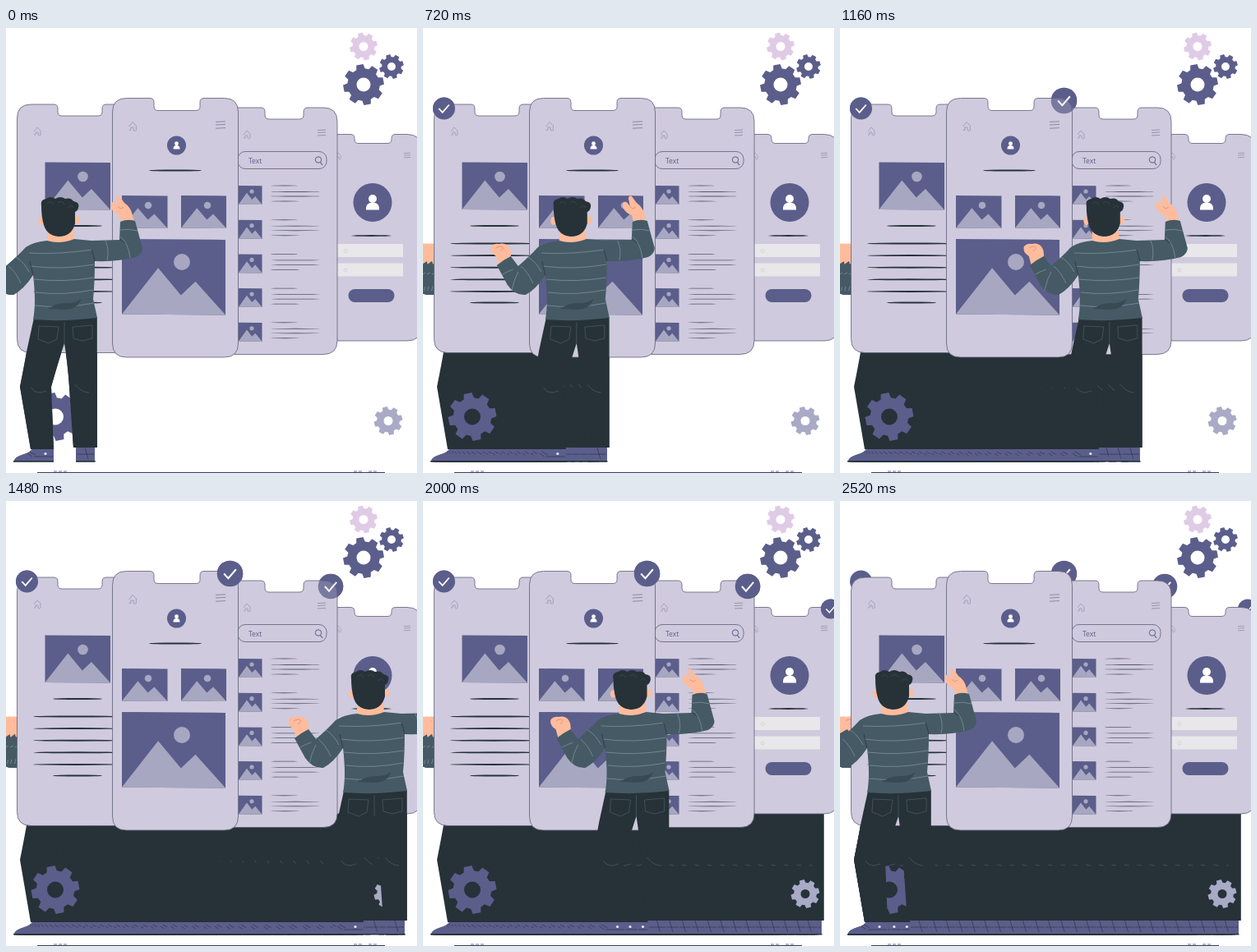
An HTML page that plays this animation: 500x542 px, repeating every 2560 ms.

```html
<!DOCTYPE html>
<html lang="en">
<head>
<meta charset="utf-8">
<title>App screens</title>
<style>
html, body { margin: 0; width: 100%; height: 100%; overflow: hidden; background: #fff; }
svg { display: block; width: 100vw; height: 100vh; }
</style>
</head>
<body>
<svg viewBox="0 0 500 542" preserveAspectRatio="none">
  <defs>
    <g id="man">
      <!-- shoes -->
      <path fill="#5b5e8b" d="M33 511L58 512V527H10Q11 522 22 519Q30 517 33 511ZM85 510H108V527H85Z"/>
      <path stroke="#263238" stroke-width="1.400" d="M9 527.800H58M85 527.800H108.500"/>
      <path fill="none" stroke="#263238" stroke-width=".6" d="M29 516L36 520M26 518L32 522M34 522H57M86 519H107M96 511L100 525"/>
      <circle cx="48" cy="518.500" r="1.600" fill="#e8e8f2"/>
      <!-- trousers -->
      <path fill="#263238" d="M34 353Q70 357 110.800 352V511H82Q79 470 77 437Q75 408 71 384Q64 405 55 437L58 513L30 513Q24 478 17 437Q22 412 25.500 392Z"/>
      <path fill="none" stroke="#53656d" stroke-width=".6" d="M40 363L64 364L62 379L52 384L39 379ZM81 364L105 362V378L93 381L82 378ZM31 438Q34 444 42 444L49 442M84 434Q92 444 101 444M71 358V384"/>
      <!-- left hand, neck, ears, right hand -->
      <g fill="#ffbc9c">
        <path d="M-24 289L-27 278Q-35 273 -33 266Q-29 262 -24 263Q-16 261 -12 266Q-8 271 -9 280Z"/>
        <path d="M50 245H82L83 258Q67 265 50 260Z"/>
        <ellipse cx="43" cy="235" rx="3.500" ry="5"/>
        <ellipse cx="86" cy="234" rx="3.500" ry="5"/>
        <path d="M141 238L138 228Q128 224 127 216Q128 211 132 212L136 217L134 207Q136 202 139 206L144 213Q151 218 153 225L156 236Z"/>
      </g>
      <path fill="none" stroke="#d3836d" stroke-width=".7" d="M-27 268Q-21 264 -18 268L-22 272M136 217Q139 222 143 218"/>
      <!-- sweater -->
      <path fill="#455a64" d="M50 259Q66 264 83 257L104 259L138 258L139 236Q148 232 157 235L166 268Q166 275 158 279Q136 285 108 284Q108 310 106 330L111 353Q70 358 33 355Q37 335 33 301Q22 318 9 325Q-4 326 -13 313L-26 289Q-19 283 -9 278L0 290Q14 278 24 267Q35 260 50 259Z"/>
      <path fill="none" stroke="#8399a3" stroke-width=".7" d="M28 274Q65 276 105 270M30 290Q67 295 107 288M34 306Q70 310 107 304M36 322Q70 326 106 319M35 338Q70 342 107 335M121 259Q126 270 123 283M139 254Q149 262 151 280M139 246Q150 244 160 247M12 279Q22 285 28 297M3 290Q12 297 18 311M-6 294Q-14 297 -19 300M0 297Q-5 306 -8 320"/>
      <path fill="none" stroke="#263238" stroke-width=".7" d="M108 284Q106 275 104 269M33 301L29 284M139 258L145 262M52 341Q75 344 91 331"/>
      <path fill="#384a53" d="M52 342Q60 334 78 335Q87 334 91 330Q88 343 70 343Z"/>
      <!-- hair -->
      <path fill="#263238" d="M43 217Q41 209 49 208Q54 204 60 208Q66 204 72 208Q79 206 82 211Q90 212 88 219Q87 223 84 224L84 238Q80 254 64 254Q50 253 46 240Q43 230 43 217Z"/>
      <path fill="none" stroke="#46565d" stroke-width=".5" d="M50 214Q55 209 58 215M63 213Q69 209 71 215M75 219Q81 214 82 219"/>
    </g>
    <g id="home" fill="none" stroke="#9a9ab8" stroke-width=".8">
      <path d="M-4 0L0-5L4-1V4Q3 6 1 4V1H-2V4H-4"/>
    </g>
    <g id="menu" stroke="#7d7f9b" stroke-width=".7">
      <path d="M-5-3L5-3.500M-5 0L5-.500M-5 3.500L5 3"/>
    </g>
    <g id="face">
      <circle r="23.500" fill="#5b5e8b"/>
      <circle cy="-4.500" r="5" fill="#fff"/>
      <path d="M-8 9V6Q-7 0 0 0Q7 0 8 6V9Z" fill="#fff"/>
    </g>
    <g id="pic">
      <path d="M0 0L100 1V100L0 99Z" fill="#5b5e8b"/>
      <path d="M0 99L35 38L57 74L71 56L100 100Z" fill="#a8a7c1"/>
    </g>
    <g id="check">
      <circle r="15" fill="#5b5e8b"/>
      <path d="M-7 0L-2 5.500L7-5" fill="none" stroke="#fff" stroke-width="2"/>
    </g>
  </defs>
  <rect width="500" height="542" fill="#fff"/>
  <path d="M38 541.500H461" stroke="#3c3f5c"/>
  <path d="M58 540H75M423 540H433M441 540H451" stroke="#6d6f88" stroke-dasharray="4 2"/>
  <g id="trail"></g>
  <g id="marks"></g>
  <g id="gears"></g>
  <g id="phones"></g>
  <g id="ticks"></g>
  <use id="hero" href="#man"/>
</svg>
<script>
const $ = id => document.getElementById(id);
const INK = '#5b5e8b', STEP = 40, COUNT = 64, REACH = 377;

function gear(x, y, r, hole, color, turn) {
  const p = [];
  for (let i = 0; i < 8; i++) {
    [[-.27, .79], [-.17, 1], [.17, 1], [.27, .79]].forEach(([a, k]) => {
      const w = turn + i * Math.PI / 4 + a;
      p.push((x + r * k * Math.cos(w)).toFixed(1) + ' ' + (y + r * k * Math.sin(w)).toFixed(1));
    });
  }
  return `<path fill="${color}" fill-rule="evenodd" d="M${p.join('L')}ZM${x - hole} ${y}a${hole} ${hole} 0 1 0 ${2 * hole} 0a${hole} ${hole} 0 1 0 ${-2 * hole} 0Z"/>`;
}

function phone(l, t, r, b, n1, n2, depth) {
  const d = depth - 5;
  return `<path fill="#cfcadd" stroke="#5d6079" stroke-width=".8" d="M${l} ${t + 17}Q${l} ${t} ${l + 17} ${t}H${n1 - 5}q5 0 5 5V${t + d}q0 5 5 5H${n2 - 5}q5 0 5-5V${t + 5}q0-5 5-5H${r - 17}Q${r} ${t} ${r} ${t + 17}V${b - 17}Q${r} ${b} ${r - 17} ${b}H${l + 17}Q${l} ${b} ${l} ${b - 17}Z"/>`;
}

const use = (id, x, y, sx = 1, sy = sx) =>
  `<use href="#${id}" transform="translate(${x} ${y}) scale(${sx} ${sy})"/>`;
const taper = (x1, x2, y, h = 1, color = '#263238') =>
  `<ellipse cx="${(x1 + x2) / 2}" cy="${y}" rx="${(x2 - x1) / 2}" ry="${h}" fill="${color}"/>`;
const box = (x, y, w, h, rx, fill) =>
  `<rect x="${x}" y="${y}" width="${w}" height="${h}" rx="${rx}" fill="${fill}"/>`;
const pic = (x, y, w, h, sx, sy, r) =>
  use('pic', x, y, w / 100, h / 100) + `<circle cx="${sx}" cy="${sy}" r="${r}" fill="#a8a7c1"/>`;

function screens() {
  let s = phone(388, 129.5, 505, 381, 424, 469, 11);
  s += use('home', 404, 156, .8) + use('menu', 488, 155, .8) + use('face', 446, 212.5);
  s += taper(420, 469, 253, .9);
  [263, 286.5].forEach(y => {
    s += box(400, y, 83, 16, 0, '#e8e8ea');
    s += `<circle cx="413" cy="${y + 8.5}" r="2" fill="none" stroke="#d4d4da"/>`;
  });
  s += box(416.5, 318, 56, 16, 8, INK);

  s += phone(262, 97, 403, 397.5, 315, 362, 14);
  s += use('home', 293, 130) + use('menu', 384, 127.5);
  s += '<rect x="282" y="150.500" width="108" height="21" rx="9" fill="none" stroke="#5d6079" stroke-width=".8"/>';
  s += `<text x="295" y="164.500" font-family="Open Sans, sans-serif" font-size="8.500" fill="${INK}">Text</text>`;
  s += `<path d="M382.500 163.500L385 167" stroke="${INK}" stroke-width="1.200"/><circle cx="380" cy="160.500" r="3.700" fill="none" stroke="${INK}"/>`;
  for (let i = 0; i < 5; i++) {
    const y = 192 + 41.7 * i;
    s += pic(283, y, 28.5, 23, 299, y + 7, 2.6);
    [[0, 355], [7.5, 382], [13, 382], [19, 357]].forEach(([dy, end]) => {
      s += taper(322, end, y + dy, .45, '#55596f');
    });
  }

  s += phone(13.5, 93, 160, 395.5, 63, 117, 14);
  s += use('home', 38, 126) + pic(47.5, 163.5, 79.5, 58, 93.5, 181, 6.3);
  s += taper(57, 117, 241) + taper(57, 117, 334.5);
  for (let i = 0; i < 5; i++) s += taper(33, 138, 262.5 + 14.6 * i);

  s += phone(129.5, 85.5, 282.5, 401, 180, 236, 15);
  s += use('home', 154, 120, 1.1) + use('menu', 261, 118, 1.2);
  s += use('face', 207.5, 143, .49) + taper(174, 238, 173.5, 1.1);
  s += pic(141, 204, 55.5, 40, 173, 216, 4.3) + pic(213, 204, 55, 40, 245, 216, 4.3);
  s += pic(141, 257, 126, 92.5, 214, 285, 10);
  return s;
}

$('gears').innerHTML =
  gear(435, 22.5, 17, 5.5, '#e0cbe6', -.24) +
  gear(435, 69, 25, 8.5, INK, -.19) +
  gear(469, 47, 15, 5, INK, -.29) +
  gear(60, 473.5, 29.5, 10, INK, -.19) +
  gear(465, 478.5, 17.5, 5.5, '#a9aac6', -.24);
$('phones').innerHTML = screens();

// x, y, scale, fade-in start, fade-out start
const CHECKS = [
  [25.5, 98, .9, 230, 2210],
  [272.5, 88.5, 1.05, 1000, 2210],
  [395, 104, 1.02, 1320, 2080],
  [496, 131.5, .8, 1640, 2060]
];
const badges = CHECKS.map(([x, y, k]) => use('check', x, y, k)).join('');
$('marks').innerHTML = badges;
$('ticks').innerHTML = badges;

const clamp = v => Math.max(0, Math.min(1, v));

function cruise(u) {
  const r = .065, v = 1 / (1 - r);
  if (u < r) return v * u * u / (2 * r);
  if (u > 1 - r) return 1 - v * (1 - u) * (1 - u) / (2 * r);
  return v * (u - r / 2);
}

function offset(t) {
  if (t < 1480) return REACH * Math.pow(clamp(t / 1460), 1.67);
  return REACH * (1 - cruise(clamp((t - 1480) / 1040)));
}

// Everything the man passes outside the screens stays painted until the loop restarts.
$('trail').innerHTML = Array.from({ length: COUNT }, (_, i) => use('man', offset(i * STEP).toFixed(1), 0)).join('');
const trail = [...$('trail').children];
const marks = [...$('marks').children], ticks = [...$('ticks').children];
let last = -1;

function draw(now) {
  const n = Math.floor(now / STEP) % COUNT;
  if (n === last) return;
  last = n;
  const t = n * STEP;
  trail.forEach((e, i) => e.setAttribute('display', i <= n ? 'inline' : 'none'));
  CHECKS.forEach(([, , , on, off], i) => {
    const rest = 1 - clamp((t - on) / 320);
    const alpha = (1 - rest * rest) * (1 - clamp((t - off) / 300));
    ticks[i].setAttribute('opacity', alpha.toFixed(3));
    marks[i].setAttribute('display', t > on + 60 ? 'inline' : 'none');
  });
  $('hero').setAttribute('transform', `translate(${offset(t).toFixed(1)} 0)`);
}

const start = performance.now();
function loop() {
  draw(performance.now() - start);
  requestAnimationFrame(loop);
}
loop();
</script>
</body>
</html>
```
